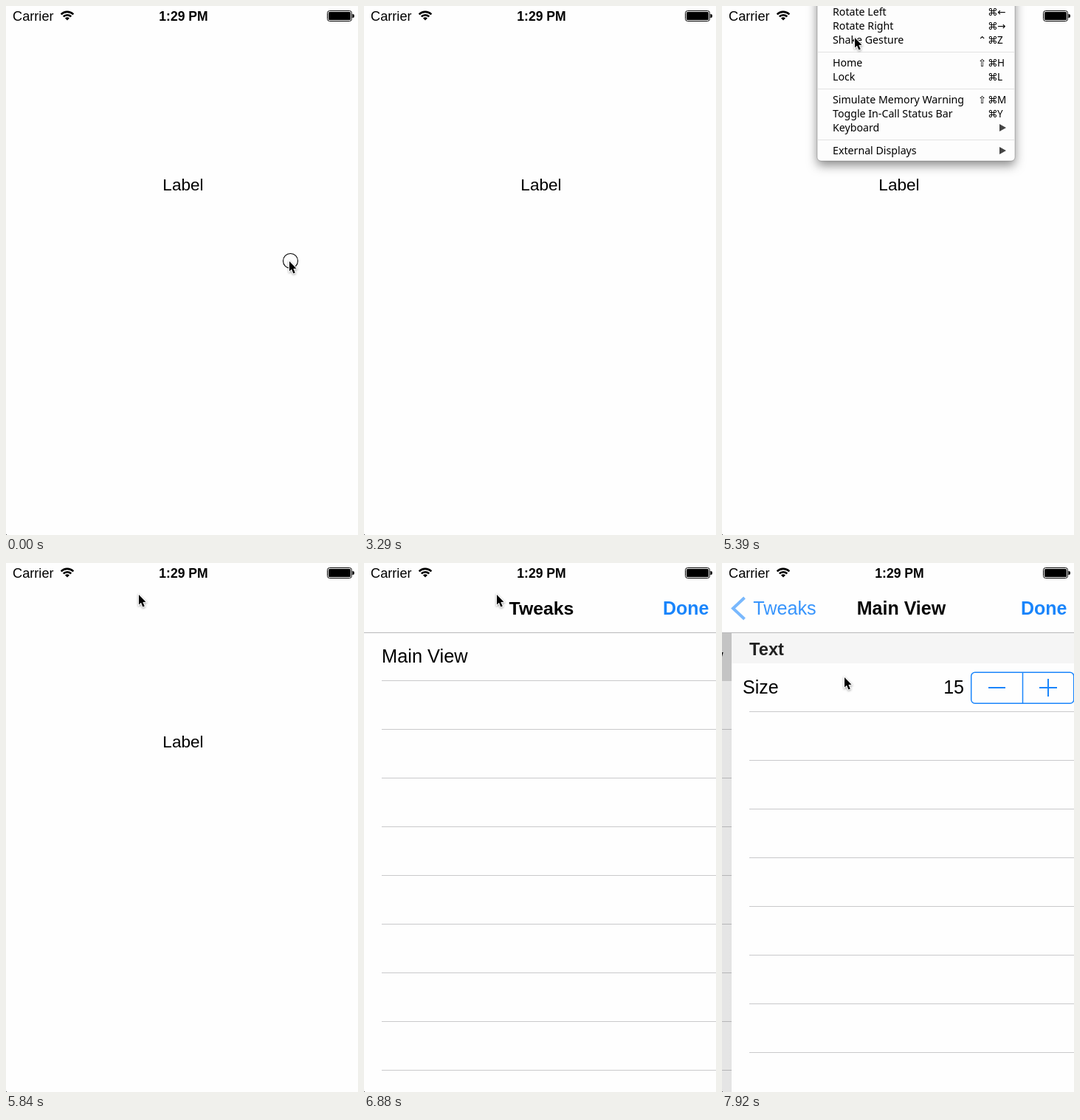
An HTML page with a canvas that plays this animation: 477x717 px, repeating every 8000 ms.

```html
<!DOCTYPE html>
<html lang="en">
<head>
<meta charset="utf-8">
<title>Tweaks demo</title>
<style>
html, body { margin: 0; width: 100%; height: 100%; overflow: hidden; background: #fefefe; }
canvas { display: block; }
</style>
</head>
<body>
<canvas id="stage" width="477" height="717"></canvas>
<script>
const W = 477, H = 717, LOOP = 8000;
const PAPER = '#fefefe', BLUE = '#1a85fb', LINE = '#c9c9cb';
const UI = '"Liberation Sans", Arial, sans-serif';
const MENU = '"Noto Sans", sans-serif', KEYS = '"DejaVu Sans", sans-serif';
const ctx = document.getElementById('stage').getContext('2d');

// Stepped tracks: [start time, values...]; missing values mean hidden.
const cursorTrack = [
  [0, 384, 346], [750, 251, 133], [900],
  [2100, 213, -16], [2250, 232, 40], [2400, 241, 94], [2550, 238, 108],
  [2700, 226, 92], [2840, 205, 48], [2990, 186, 8], [3140],
  [4640, 178, 17], [4790, 179, 25], [4940, 180, 33], [5090, 180, 40], [5240, 180, 43],
  [7030, 177, 70], [7180, 168, 128], [7320, 166, 155]
];
const highlightTrack = [[0, -1], [4640, 0], [4790, 1], [5090, 2], [5390, -1], [5540, 2]];
const sheetTrack = [[0, H], [6440, 610], [6590, 170], [6730, 30], [6880, 0]];
const pushTrack = [[0, W], [7770, 110], [7920, 13]];
const at = (track, t) => track.findLast(k => k[0] <= t).slice(1);

const menuItems = [
  ['Rotate Left', 8, '', '⌘', '←'], ['Rotate Right', 27, '', '⌘', '→'],
  ['Shake Gesture', 46, '⌃', '⌘', 'Z'], ['Home', 77, '⇧', '⌘', 'H'],
  ['Lock', 96, '', '⌘', 'L'], ['Simulate Memory Warning', 127, '⇧', '⌘', 'M'],
  ['Toggle In-Call Status Bar', 146, '', '⌘', 'Y'],
  ['Keyboard', 165], ['External Displays', 196]
];

function rect(x, y, w, h, color) {
  ctx.fillStyle = color;
  ctx.fillRect(x, y, w, h);
}

function text(str, x, y, size, { color = '#000', bold = false, align = 'left', font = UI, alpha = 1 } = {}) {
  ctx.save();
  ctx.globalAlpha *= Math.max(0, alpha);
  ctx.font = `${bold ? 'bold ' : ''}${size}px ${font}`;
  ctx.textAlign = align;
  ctx.fillStyle = color;
  ctx.fillText(str, x, y);
  ctx.restore();
}

function polygon(points, x, y) {
  ctx.beginPath();
  points.forEach(([px, py]) => ctx.lineTo(x + px, y + py));
  ctx.closePath();
}

function stroke(points, color, width) {
  ctx.beginPath();
  points.forEach(([x, y]) => ctx.lineTo(x, y));
  ctx.strokeStyle = color;
  ctx.lineWidth = width;
  ctx.stroke();
}

function roundRect(x, y, w, h, r) {
  ctx.beginPath();
  ctx.roundRect(x, y, w, h, r);
}

function rowLines(x, y) {
  for (; y < H; y += 66) rect(x, y, W + 150, 1, LINE);
}

function statusBar() {
  text('Carrier', 9, 20, 18.2);
  text('1:29 PM', 240.5, 20, 17.6, { bold: true, align: 'center' });
  const a = -Math.PI / 2, spread = 0.8;
  ctx.strokeStyle = '#000';
  ctx.lineWidth = 2.6;
  for (const r of [11.6, 7.3]) {
    ctx.beginPath();
    ctx.arc(83, 19.5, r, a - spread, a + spread);
    ctx.stroke();
  }
  ctx.fillStyle = '#000';
  ctx.beginPath();
  ctx.moveTo(83, 19.5);
  ctx.arc(83, 19.5, 4.2, a - spread, a + spread);
  ctx.fill();
  ctx.lineWidth = 1;
  roundRect(435.5, 6.5, 33, 14, 3);
  ctx.stroke();
  roundRect(437, 8, 30, 11, 1.5);
  ctx.fill();
  roundRect(469.5, 11, 2.5, 5, [0, 2, 2, 0]);
  ctx.fill();
}

function menu(highlight) {
  ctx.save();
  ctx.shadowColor = 'rgba(0,0,0,.45)';
  ctx.shadowBlur = 14;
  ctx.shadowOffsetY = 6;
  ctx.fillStyle = '#fdfdfd';
  roundRect(129, -20, 268, 230, 5);
  ctx.fill();
  ctx.shadowColor = 'transparent';
  ctx.strokeStyle = 'rgba(0,0,0,.22)';
  ctx.lineWidth = 1;
  ctx.stroke();
  ctx.restore();
  for (const y of [62, 112, 181]) rect(130, y, 266, 1, '#e2e2e2');
  menuItems.forEach(([label, mid, ...keys], i) => {
    const color = i === highlight ? '#fff' : '#000';
    if (i === highlight) {
      const g = ctx.createLinearGradient(0, mid - 9, 0, mid + 10);
      g.addColorStop(0, '#648bf3');
      g.addColorStop(1, '#1d55ee');
      rect(129, mid - 9, 268, 19, g);
    }
    text(label, 150, mid + 5, 14.2, { color, font: MENU });
    if (keys.length) {
      keys.forEach((key, k) => text(key, 347 + 13 * k, mid + 5, 13.5, { color, font: k < 2 || i < 2 ? KEYS : MENU }));
    } else {
      polygon([[0, -5], [9, 0], [0, 5]], 376, mid);
      ctx.fillStyle = '#444';
      ctx.fill();
    }
  });
}

function detailView(x) {
  const g = ctx.createLinearGradient(x - 9, 0, x, 0);
  g.addColorStop(0, 'rgba(0,0,0,0)');
  g.addColorStop(1, `rgba(0,0,0,${0.15 * x / W})`);
  rect(x - 9, 95, 9, H, g);
  ctx.save();
  ctx.translate(x, 0);
  rect(0, 95, W, H, PAPER);
  rect(0, 95, W, 41, '#f5f5f5');
  text('Text', 24, 125, 23.7, { bold: true, color: '#222' });
  text('Size', 15, 177, 25);
  text('15', 315, 177, 25, { align: 'right' });
  ctx.strokeStyle = BLUE;
  ctx.lineWidth = 1.5;
  roundRect(324.7, 148.2, 139, 42, 5);
  ctx.stroke();
  stroke([[394.5, 148], [394.5, 190]], BLUE, 1.5);
  stroke([[348, 169], [371, 169]], BLUE, 2);
  stroke([[417, 169], [441, 169]], BLUE, 2);
  stroke([[429, 157], [429, 181]], BLUE, 2);
  rowLines(24, 201);
  ctx.restore();
}

function sheet(top, push, selected) {
  const left = push / W, done = 1 - left;
  ctx.save();
  ctx.translate(0, top);
  rect(0, 43, W, H, PAPER);

  // The list drifts left and dims beneath the pushed view.
  ctx.save();
  ctx.translate(-143 * done, 0);
  rowLines(24, 159);
  if (selected) rect(0, 95, W, 65, '#d9d9d9');
  text('Main View', 24, 135, 25.4);
  ctx.restore();
  if (done > 0) rect(0, 95, W, H, `rgba(0,0,0,${0.1 * done})`);
  if (selected) detailView(push);

  if (selected && !done) rect(0, 64, W, 30, '#f6f6f6');
  rect(0, 94, W, 1, selected && !done ? '#a0a0a0' : '#b8b8ba');
  text('Tweaks', 240.5 - 155 * done, 70, 24.8, { bold: true, align: 'center', alpha: 1 - 2 * done });
  text('Done', 405, 70, 25, { bold: true, color: BLUE });
  if (done > 0) {
    text('Main View', 240.5 + 90 * left, 70, 25, { bold: true, align: 'center', alpha: done });
    text('Tweaks', 38 + 158 * left, 70, 25.2, { color: BLUE, alpha: 0.9 * done });
    ctx.globalAlpha = 0.6 * done;
    stroke([[30.5, 47], [15, 61.5], [30.5, 76]], BLUE, 4);
  }
  ctx.restore();
}

function cursor(x, y) {
  ctx.save();
  ctx.shadowColor = 'rgba(0,0,0,.4)';
  ctx.shadowBlur = 3;
  ctx.shadowOffsetY = 1;
  polygon([[0, 0], [0, 13.5], [3, 10.8], [5.4, 16.4], [7.8, 15.4], [5.4, 10], [9.5, 9.7]], x, y);
  ctx.strokeStyle = '#fff';
  ctx.lineWidth = 2;
  ctx.stroke();
  ctx.shadowColor = 'transparent';
  ctx.fillStyle = '#000';
  ctx.fill();
  ctx.restore();
}

function touchRing(x, y) {
  ctx.beginPath();
  ctx.arc(x, y, 10, 0, 2 * Math.PI);
  ctx.strokeStyle = '#000';
  ctx.lineWidth = 1.1;
  ctx.stroke();
}

function draw(t) {
  const [x, y] = at(cursorTrack, t);
  const [top] = at(sheetTrack, t);
  const selected = t >= 7620;
  rect(0, 0, W, H, PAPER);
  text('Label', 240, 250, 22.6, { align: 'center' });
  if (top < H) sheet(top, at(pushTrack, t)[0], selected);
  statusBar();
  rect(0, 716, 1, 1, '#555');
  if (t >= 3890 && t < 5840) {
    ctx.globalAlpha = t < 5690 ? 1 : 0.4;
    menu(at(highlightTrack, t)[0]);
    ctx.globalAlpha = 1;
  }
  if (t < 150) touchRing(385.5, 345.5);
  if (selected && t < 7770) touchRing(167.5, 154.5);
  if (x !== undefined) cursor(x, y);
}

function frame() {
  draw(performance.now() % LOOP);
  requestAnimationFrame(frame);
}
frame();
</script>
</body>
</html>
```
